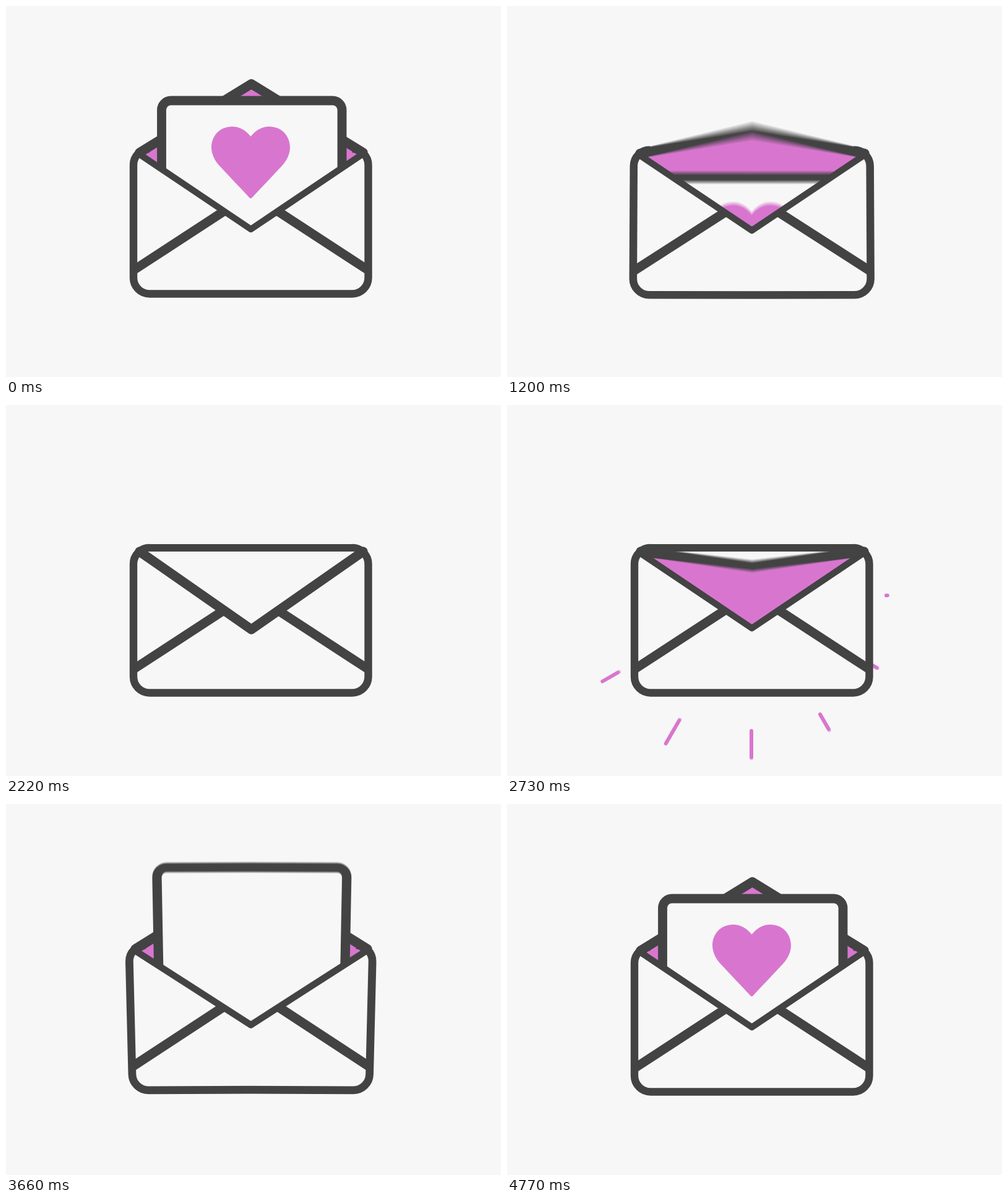
Write an HTML page with a canvas that moves like this. It is 800 px wide and 600 px high and loops after 4800 ms.

```html
<!DOCTYPE html>
<html lang="en">
<head>
<meta charset="utf-8">
<title>Love letter</title>
<style>
html, body { margin: 0; width: 100%; height: 100%; overflow: hidden; background: #f7f7f7; }
canvas { display: block; width: 800px; height: 600px; }
</style>
</head>
<body>
<canvas id="stage" width="800" height="600"></canvas>
<script>
const LOOP = 4800, SHUTTER = 10, SAMPLES = 8;
const PAPER = '#f7f7f7', INK = '#434343', PINK = '#d876cf';
const MID = 395.75, HINGE = 237;

const stage = document.getElementById('stage').getContext('2d');
const layer = document.createElement('canvas');
layer.width = 800;
layer.height = 600;
const ctx = layer.getContext('2d');

const clamp = u => Math.max(0, Math.min(1, u));
const smooth = u => u * u * (3 - 2 * u);
const cubic = u => u < 0.5 ? 4 * u ** 3 : 1 - 4 * (1 - u) ** 3;
const mix = (a, b, u) => a + (b - a) * u;
const ramp = (t, from, to) => smooth(clamp((t - from) / (to - from)));

// Keys are [time, value, easing into the key].
function track(t, keys) {
  if (t <= keys[0][0]) return keys[0][1];
  for (let i = 1; i < keys.length; i++) {
    const [t0, v0] = keys[i - 1], [t1, v1, ease = smooth] = keys[i];
    if (t < t1) return mix(v0, v1, ease((t - t0) / (t1 - t0)));
  }
  return keys[keys.length - 1][1];
}

const SQUASH = [[1080, 0], [1420, 0.7], [1880, 0], [3110, 0], [3325, 1], [3480, 0]];
const STRETCH = [[3430, 0], [3880, 1.4], [4240, 0.2], [4600, 0]];
const FLAP = [[850, 126], [1040, 109], [1400, 363, cubic], [2290, 363], [3216, 126, cubic]];
const CARD = [[600, 153], [790, 83.5], [850, 83.5], [1450, 390], [3275, 366], [3540, 78],
  [3830, 165], [4020, 163], [4300, 153]];
const HEART = [[0, 1], [270, 1.015], [560, 1], [1700, 1], [1701, 0], [3866, 0], [4098, 1]];
const HEART_DROP = [[3400, 0], [3700, 5], [4020, 5], [4300, 0]];

let squash = 0, stretch = 0, penX = 0, penY = 0;

function warp(x, y) {
  const u = (x - MID) / 195;
  const bulge = 1 - u * u;
  const wide = squash * (0.031 + 0.000135 * (y - 255)) + stretch * (0.051 - 0.00018 * (y - 240));
  const lift = 3 + 2 * bulge + Math.max(0, HINGE - y) * 0.055;
  return [MID + (x - MID) * (1 + wide), y + squash * (8 + 2 * bulge) - stretch * lift];
}

function move(x, y) {
  ctx.beginPath();
  ctx.moveTo(...warp(x, y));
  penX = x;
  penY = y;
}

function curve(x1, y1, x2, y2, x, y) {
  ctx.bezierCurveTo(...warp(x1, y1), ...warp(x2, y2), ...warp(x, y));
  penX = x;
  penY = y;
}

function line(x, y) {
  curve(mix(penX, x, 1 / 3), mix(penY, y, 1 / 3), mix(penX, x, 2 / 3), mix(penY, y, 2 / 3), x, y);
}

function corner(cx, cy, x, y) {
  const k = 0.552;
  curve(mix(penX, cx, k), mix(penY, cy, k), mix(x, cx, k), mix(y, cy, k), x, y);
}

function fill(color) {
  ctx.fillStyle = color;
  ctx.fill();
}

function stroke(width, color = INK) {
  ctx.lineWidth = width;
  ctx.strokeStyle = color;
  ctx.stroke();
}

// Outlines thicken a little as the envelope widens.
function outline(width) {
  stroke(width * (1 + 0.04 * (squash + stretch)));
}

function drawRays(t) {
  ctx.lineCap = 'round';
  for (let i = 0; i < 12; i++) {
    const age = t - 2510 - i * 40;
    const head = ramp(age, 0, 200), tail = ramp(age, 125, 325);
    if (head <= tail) continue;
    const angle = (150 - 30 * i) * Math.PI / 180;
    const [near, far] = i % 3 === 2 ? [218, 274] : [222, 278];
    const c = Math.cos(angle), s = Math.sin(angle);
    const r0 = mix(near, far, tail), r1 = mix(near, far, head);
    ctx.beginPath();
    ctx.moveTo(395 + c * r0, 308 + s * r0);
    ctx.lineTo(395 + c * r1, 308 + s * r1);
    stroke(6, PINK);
  }
  ctx.lineCap = 'butt';
}

function drawFlap(apex) {
  const down = apex > HINGE;
  move(216, HINGE);
  line(396.5, apex);
  line(577, HINGE);
  fill(down ? PAPER : PINK);
  ctx.lineCap = 'round';
  outline(15.4);
  ctx.lineCap = 'butt';
  if (!down) return;
  move(230, 231);
  line(561.5, 231);
  outline(12.2);
}

function drawInside() {
  move(220, 234);
  line(214, 238.6);
  line(MID, 361);
  line(577.5, 238.6);
  line(571.5, 234);
  fill(PINK);
}

function drawHeart(cy, scale, color) {
  if (scale <= 0) return;
  const half = side => {
    const bend = (...p) => curve(...p.map((v, i) => i % 2 ? cy + v * scale : 395.5 + v * scale * side));
    move(395.5, cy - 42 * scale);
    bend(-8, -52, -18, -58, -30, -58);
    bend(-49, -58, -63.5, -44, -63.5, -24);
    bend(-63.5, -14, -58, -2, -50, 6);
    bend(-34, 23, -18, 40, -3, 56);
    bend(-2, 57.5, -1, 58, 0, 58);
    // A slight overlap hides the seam between the halves.
    line(395.5 + side * 0.6, cy + 57 * scale);
    line(395.5 + side * 0.6, cy - 41.5 * scale);
    fill(color);
  };
  half(1);
  half(-1);
}

function drawCard(t, top) {
  const left = 251.5, right = 543, r = 15;
  ctx.save();
  ctx.beginPath();
  ctx.rect(0, 0, 800, 430);
  ctx.clip();
  move(left, 440);
  line(left, top + r);
  corner(left, top, left + r, top);
  line(right - r, top);
  corner(right, top, right, top + r);
  line(right, 440);
  fill(PAPER);
  outline(14.8);

  const cy = top + 100 + track(t, HEART_DROP);
  const hole = ramp(t, 3830, 4085);
  if (hole < 1) {
    drawHeart(cy, 1.46 * ramp(t, 3750, 3980), PINK);
    drawHeart(cy, 1.47 * hole, PAPER);
  }
  drawHeart(cy, track(t, HEART), PINK);
  ctx.restore();
}

function drawFront() {
  const left = 206, right = 585.5, top = 231, bottom = 465.5, r = 26;
  const sides = () => {
    line(left, bottom - r);
    corner(left, bottom, left + r, bottom);
    line(right - r, bottom);
    corner(right, bottom, right, bottom - r);
    line(right, top + r);
  };
  move(MID, 361);
  line(214, 238.6);
  line(left, top + r);
  sides();
  line(577.5, 238.6);
  line(MID, 361);
  fill(PAPER);

  move(206, 427.4);
  line(352.9, 331.5);
  outline(14.8);
  move(585.5, 427.4);
  line(438.6, 331.5);
  outline(14.8);

  move(214, 238.6);
  line(MID, 361);
  line(577.5, 238.6);
  outline(10.4);

  move(left + r, top);
  corner(left, top, left, top + r);
  sides();
  corner(right, top, right - r, top);
  outline(12.4);
}

function drawScene(time) {
  const t = (time + LOOP) % LOOP;
  squash = track(t, SQUASH);
  stretch = track(t, STRETCH);
  const apex = track(t, FLAP);
  ctx.fillStyle = PAPER;
  ctx.fillRect(0, 0, 800, 600);
  ctx.lineJoin = 'round';
  drawRays(t);
  drawInside();
  if (apex <= HINGE) drawFlap(apex);
  drawCard(t, track(t, CARD));
  drawFront();
  if (apex > HINGE) drawFlap(apex);
}

// Averages several moments within the shutter time for motion blur.
function render(t) {
  for (let i = 0; i < SAMPLES; i++) {
    drawScene(t + ((i + 0.5) / SAMPLES - 0.5) * SHUTTER);
    stage.globalAlpha = 1 / (i + 1);
    stage.drawImage(layer, 0, 0);
  }
}

const start = performance.now();
function tick() {
  render((performance.now() - start) % LOOP);
  requestAnimationFrame(tick);
}
tick();
</script>
</body>
</html>
```
